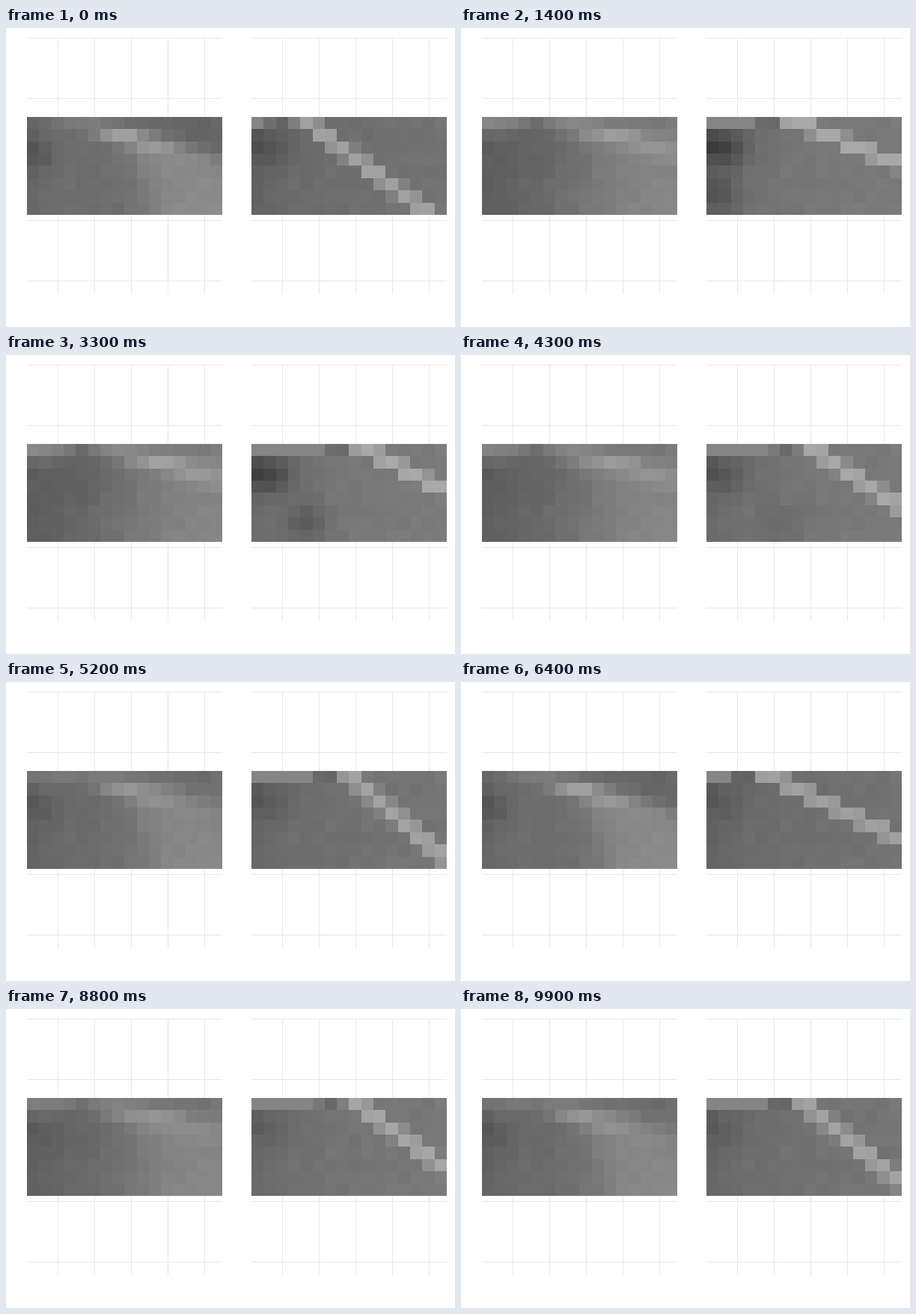
Write a matplotlib script that moves like this. It is 600x400 px and loops after 10 s.

```python
import numpy as np
import matplotlib.pyplot as plt
from matplotlib.animation import FuncAnimation

W, H, DPI = 600, 400, 100
ROWS, COLS, CELL = 8, 16, 16.3
TOP = 119.5
FRAMES, STEP = 100, 100

r, x = np.mgrid[0:ROWS, 0:COLS].astype(float)
x += 0.5
GRAIN = np.random.default_rng(4).normal(0, 1.5, (ROWS, COLS))

# Path of the bright streak: time in s, column where it starts, columns per row
TIMES = [0, 1.4, 3.3, 5.2, 6.4, 7.7, 9.9]
STARTS = [4.6, 7.6, 9.5, 8.2, 5.4, 9.3, 8.1]
SLOPES = [1.35, 2.4, 1.9, 1.15, 2.05, 1.5, 1.22]


def bump(v, mid, width):
    return np.exp(-((v - mid) / width) ** 2)


def sig(v):
    return 1 / (1 + np.exp(-v))


def steep_field():
    d = x - 4.8 - 2.8 * r
    ridge = 44 * bump(r, 1.1, 1.1) * bump(d, 0, 2)
    plateau = 28 * sig(1.2 * (x - 8.1 - 0.3 * r)) * sig(2.5 - d)
    dark = 20 * bump(x, 0.8, 1.4) * bump(r, 2.5, 1.3) + 9 * np.exp(-x / 1.5)
    return 110 + ridge + plateau - dark - 9 * sig(d - 4)


def flat_field():
    ridge = 38 * np.exp((1 - r) / 2) * bump(x - 3.2 * r, 7.5, 2.5)
    z = 92 + 42 * sig((x - 8) / 2.2) + np.where(r > 0, ridge, 0)
    z += 14 * bump(x, 0, 3) * bump(r, 1, 0.5)
    band = 123 + 16 * bump(x, 8, 2) + 16 * bump(x, 0.4, 1.6) - 15 * bump(x, 4.5, 1)
    return np.where(r == 0, band, z) + 5 * bump(x, 6, 4) * sig(4 * (r - 4.5))


STEEP, FLAT = steep_field() + GRAIN, flat_field() + GRAIN


def streak(t):
    """Start, slope and how far the scene leans to the flat field."""
    start, slope = np.interp(t, TIMES, STARTS), np.interp(t, TIMES, SLOPES)
    lean = np.clip((start + 1.5 * slope - 7.8) / 3.6, 0, 1) ** 2
    return start, slope, lean


def smooth_map(t):
    lean = streak(t)[2]
    return (1 - lean) * STEEP + lean * FLAT


def cover(lo, hi):
    """Share of each cell between two column positions."""
    return np.clip(np.minimum(x + 0.5, hi) - np.maximum(x - 0.5, lo), 0, 1)


def sharp_map(t):
    start, slope, lean = streak(t)
    mid = start + slope * r
    half = 0.4 + 0.45 * slope
    base = 108 + 8 * lean
    z = base - 10 * np.exp(-x / 3) + 7 * x / COLS + GRAIN

    # dark corner, and a shadow drifting right along the bottom
    shade = bump(t, 2.3, 1.8)
    z -= (12 + 45 * shade) * bump(x, 1, 2.4) * bump(r, 2, 1.5)
    z -= 34 * shade * bump(x, 1 + 1.8 * (t - 1.4), 1.7) * bump(r, 5.8, 1.6)

    # light band on the top row, then a dark gap before the streak
    edge = start - half
    z += (r == 0) * cover(0, edge - 2) * (133 - z)
    z += (r == 0) * cover(edge - 2, edge) * (base - 9 - z)
    return z + cover(mid - half, mid + half) * (161 + 8 * lean - z)


fig = plt.figure(figsize=(W / DPI, H / DPI), dpi=DPI, facecolor="white")
ax = fig.add_axes([0, 0, 1, 1])


def panel(left):
    width = COLS * CELL
    line = dict(color="#e8e8e8", lw=0.72, zorder=1, snap=False,
                solid_capstyle="butt")
    for i in range(5):
        gx = left + int(41.4 + 3 * CELL * i) + 0.5
        gy = int(13 + 5 * CELL * i) + 0.5 if i < 2 else int(12.5 + 5 * CELL * i) + 0.5
        ax.plot([gx, gx], [13, 356], **line)
        ax.plot([left, left + width], [gy, gy], **line)
    return ax.imshow(np.zeros((ROWS, COLS)), cmap="gray", vmin=0, vmax=255,
                     extent=(left, left + width, TOP + ROWS * CELL, TOP),
                     aspect="auto", interpolation="nearest", zorder=2)


smooth, sharp = panel(28), panel(328)
ax.set_xlim(0, W)
ax.set_ylim(H, 0)
ax.axis("off")


def draw(i):
    t = i * STEP / 1000
    smooth.set_data(smooth_map(t))
    sharp.set_data(sharp_map(t))
    return smooth, sharp


anim = FuncAnimation(fig, draw, frames=FRAMES, interval=STEP, repeat=True, repeat_delay=0)
plt.show()
```
